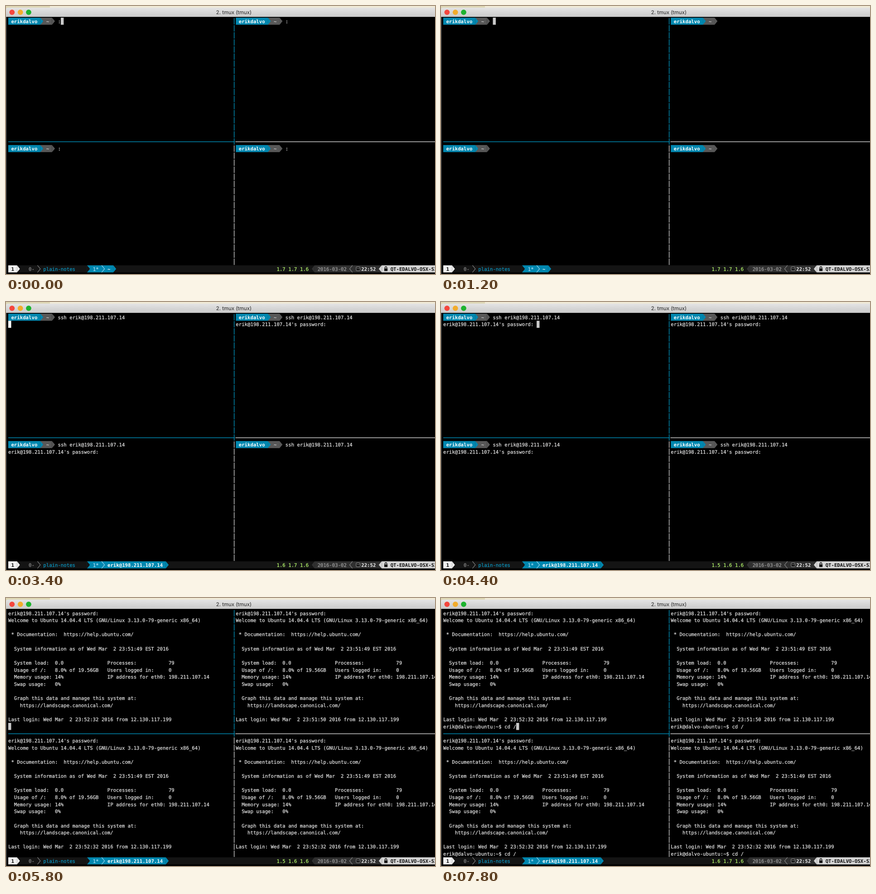
Recreate the animation shown at these times as an HTML page. Size 947 by 592 pixels, loop 8 s.

```html
<!DOCTYPE html>
<html lang="en">
<head>
<meta charset="utf-8">
<title>tmux</title>
<style>
  html, body { margin: 0; width: 100%; height: 100%; overflow: hidden; background: #000; }
  svg { display: block; position: absolute; left: 0; top: 0; }
  text {
    font-family: "DejaVu Sans Mono", "Noto Sans Mono", monospace;
    font-size: 10.697px;
    white-space: pre;
    text-rendering: geometricPrecision;
    color: #e2e2e2;
    fill: currentColor;
    stroke: currentColor;
    stroke-width: 0.25px;
  }
  .bold { font-weight: 700; stroke: none; }
  .title { font-family: Inter, Roboto, sans-serif; font-size: 11.4px; color: #222; stroke: none; text-anchor: middle; }
</style>
</head>
<body>
<svg id="stage" width="947" height="592" viewBox="0 0 947 592">
  <defs>
    <linearGradient id="bar" x1="0" y1="0" x2="0" y2="1">
      <stop offset="0" stop-color="#e4e4e4"/>
      <stop offset="1" stop-color="#c9c9c9"/>
    </linearGradient>
  </defs>
</svg>
<script>
const LOOP = 8000, TICK = 200;
const CW = 6.44, RH = 15.63, X0 = 5, Y0 = 25.8;
const BLUE = '#0087af', GRAY = '#585858', BAR = '#141414', DARK = '#303030', PALE = '#d4d4d4';
const USER = 'erikdalvo', LOGIN = 'erik', HOST = 'dalvo-ubuntu', IP = '198.211.107.14';
const REMOTE = `${LOGIN}@${IP}`, SSH = `ssh ${REMOTE}`;
const ASK = `${REMOTE}'s password: `, SHELL = `${LOGIN}@${HOST}:~$ `;

const stage = document.getElementById('stage');
const px = col => X0 + col * CW;
const py = row => Y0 + row * RH;

function add(tag, attrs, parent = stage) {
  const el = document.createElementNS('http://www.w3.org/2000/svg', tag);
  for (const key in attrs) el.setAttribute(key, attrs[key]);
  parent.appendChild(el);
  return el;
}
const rect = (x, y, width, height, fill, parent) => add('rect', { x, y, width, height, fill }, parent);
const block = (col, row, cols, fill, parent) => rect(px(col), py(row), cols * CW, RH, fill, parent);

function write(col, row, str, color, bold, parent) {
  const el = add('text', { x: px(col), y: py(row) + 11.8 }, parent);
  if (color) el.style.color = color;
  if (bold) el.setAttribute('class', 'bold');
  el.textContent = str;
  return el;
}

// Powerline separators: dir 1 points right, -1 points left
function arrowPath(col, row, dir) {
  const x = px(dir > 0 ? col : col + 1), y = py(row);
  return `M${x} ${y}l${dir * CW} ${RH / 2}l${-dir * CW} ${RH / 2}`;
}
const arrow = (col, row, fill, dir = 1, parent) =>
  add('path', { d: arrowPath(col, row, dir) + 'z', fill }, parent);
const chevron = (col, row, stroke, dir = 1, parent) =>
  add('path', { d: arrowPath(col, row, dir), fill: 'none', stroke, 'stroke-width': 1.1 }, parent);

function drawWindow() {
  rect(0, 0, 947, 592, '#000');
  rect(0, 0, 947, 10, '#f0ead6');
  rect(0, 0, 97, 10, '#ded7b4');
  add('path', { d: 'M0 24V8Q0 3.5 4.5 3.5H947V24Z', fill: 'url(#bar)' });
  rect(0, 24, 1, 568, '#666');
  [[13.3, '#f4463d'], [31.7, '#f2ac2b'], [50, '#1db32f']].forEach(([cx, fill]) =>
    add('circle', { cx, cy: 13.8, r: 5.9, fill }));
  add('text', { x: 503, y: 18, class: 'title' }).textContent = '2. tmux (tmux)';
}

function drawDividers() {
  for (let row = 0; row < 35; row++)
    rect(502.9, py(row) + 0.8, 1.5, RH - 1.6, row < 18 ? BLUE : '#bdbdbd');
  rect(5, 299.1, 500, 1.5, BLUE);
  rect(506.5, 299.1, 440.5, 1.5, '#c8c8c8');
}

function makePane(col, row, loginTime) {
  const prompt = add('g', {});
  block(col, row, 11, BLUE, prompt);
  block(col + 11, row, 4, GRAY, prompt);
  arrow(col + 11, row, BLUE, 1, prompt);
  arrow(col + 15, row, GRAY, 1, prompt);
  write(col + 1, row, USER, '#fff', true, prompt);
  write(col + 13, row, '~', '#d0d0d0', true, prompt);
  const input = write(col + 17, row, '', null, false, prompt);
  const lines = Array.from({ length: 17 }, (_, i) => write(col, row + i, ''));
  return { prompt, input, lines, loginTime };
}

const welcome = time => [
  ASK,
  'Welcome to Ubuntu 14.04.4 LTS (GNU/Linux 3.13.0-79-generic x86_64)',
  '',
  ' * Documentation:  https://help.ubuntu.com/',
  '',
  '  System information as of Wed Mar  2 23:51:49 EST 2016',
  '',
  '  System load:  0.0'.padEnd(34) + 'Processes:'.padEnd(21) + '79',
  '  Usage of /:   8.0% of 19.56GB'.padEnd(34) + 'Users logged in:'.padEnd(21) + '0',
  '  Memory usage: 14%'.padEnd(34) + 'IP address for eth0: ' + IP,
  '  Swap usage:   0%',
  '',
  '  Graph this data and manage this system at:',
  '    https://landscape.canonical.com/',
  '',
  `Last login: Wed Mar  2 ${time} 2016 from 12.130.117.199`
];

function drawStatus() {
  const r = 35, y = py(r);
  rect(X0, y, 942, RH, BAR);
  block(0, r, 3, '#eee');
  arrow(3, r, '#eee');
  write(1, r, '1', '#000', true);
  write(7, r, '0-', '#8a8a8a');
  chevron(10, r, '#8a8a8a');
  write(12, r, 'plain-notes', '#0a93bd');

  const tab = block(27, r, 9, BLUE);
  arrow(27, r, BAR);
  write(29, r, '1*', '#a5dcf5');
  chevron(32, r, '#a5dcf5');
  const name = write(34, r, '~', '#fff', true);
  const tip = arrow(0, r, BLUE);

  const load = write(92, r, '', '#b4f56c');
  arrow(104, r, DARK, -1);
  block(105, r, 42, DARK);
  write(106, r, '2016-03-02', '#9e9e9e');
  chevron(117, r, '#8a8a8a', -1);
  add('rect', { x: 773, y: y + 3.4, width: 8.5, height: 8.5, rx: 1, fill: '#111', stroke: '#a0a0a0' });
  add('path', { d: `M775 ${y + 6}l2.3 2l3 -2.3`, fill: 'none', stroke: '#a0a0a0' });
  write(121, r, '22:52', '#eee', true);
  arrow(127, r, PALE, -1);
  block(128, r, 20, PALE);
  rect(835, y + 6.8, 7.2, 5.8, '#111');
  add('path', { d: `M836.5 ${y + 7}v-1.8a2.1 2.3 0 0 1 4.2 0v1.8`, fill: 'none', stroke: '#111', 'stroke-width': 1.4 });
  write(131, r, 'QT-EDALVO-OSX-SI', '#111', true);
  return { tab, name, tip, load };
}

drawWindow();
drawDividers();
const panes = [
  makePane(0, 0, '23:52:32'), makePane(78, 0, '23:51:50'),
  makePane(0, 18, '23:52:32'), makePane(78, 18, '23:52:32')
];
const status = drawStatus();
const cursor = block(0, 0, 1, '#c9c9c9');

const inputs = [[0, ':'], [200, ''], [1400, SSH.slice(0, 6)], [1600, SSH.slice(0, 12)],
  [1800, SSH.slice(0, 18)], [2000, SSH]];
const loads = [[0, '1.7 1.7 1.6'], [2000, '1.6 1.7 1.6'], [4400, '1.5 1.6 1.6'], [6600, '1.6 1.7 1.6']];
const names = [[0, '~'], [2800, REMOTE]];
const shells = [[0, ''], [6000, SHELL], [7200, SHELL + 'c'], [7400, SHELL + 'cd'],
  [7600, SHELL + 'cd '], [7800, SHELL + 'cd /']];
const askTimes = [3600, 3400, 3400, 3600];
const ENTER = 2400, SENT = 5200, READY = 5800;

const pick = (table, t) => table.filter(([start]) => start <= t).pop()[1];

function cursorCell(t) {
  if (t < ENTER) return [17 + pick(inputs, t).length, 0];
  if (t < askTimes[0]) return [0, 1];
  if (t < SENT) return [ASK.length, 1];
  if (t < READY) return [0, 2];
  return [pick(shells, t).length, 16];
}

function draw(t) {
  const ready = t >= READY;
  panes.forEach((pane, i) => {
    pane.prompt.style.display = ready ? 'none' : '';
    pane.input.textContent = pick(inputs, t);
    const rows = ready ? [...welcome(pane.loginTime), pick(shells, t)]
      : t >= askTimes[i] ? ['', ASK] : [];
    pane.lines.forEach((line, n) => { line.textContent = rows[n] || ''; });
  });

  const [col, row] = cursorCell(t);
  cursor.setAttribute('x', px(col));
  cursor.setAttribute('y', py(row));
  cursor.setAttribute('fill', t >= ENTER && t < askTimes[0] ? '#fff' : '#c9c9c9');

  const name = pick(names, t), end = 35 + name.length;
  status.name.textContent = name;
  status.load.textContent = pick(loads, t);
  status.tab.setAttribute('width', (end - 27) * CW);
  status.tip.setAttribute('d', arrowPath(end, 35, 1) + 'z');
}

let last = -1;
function loop() {
  const t = Math.floor(performance.now() % LOOP / TICK) * TICK;
  if (t !== last) draw(last = t);
  requestAnimationFrame(loop);
}
loop();
</script>
</body>
</html>
```
